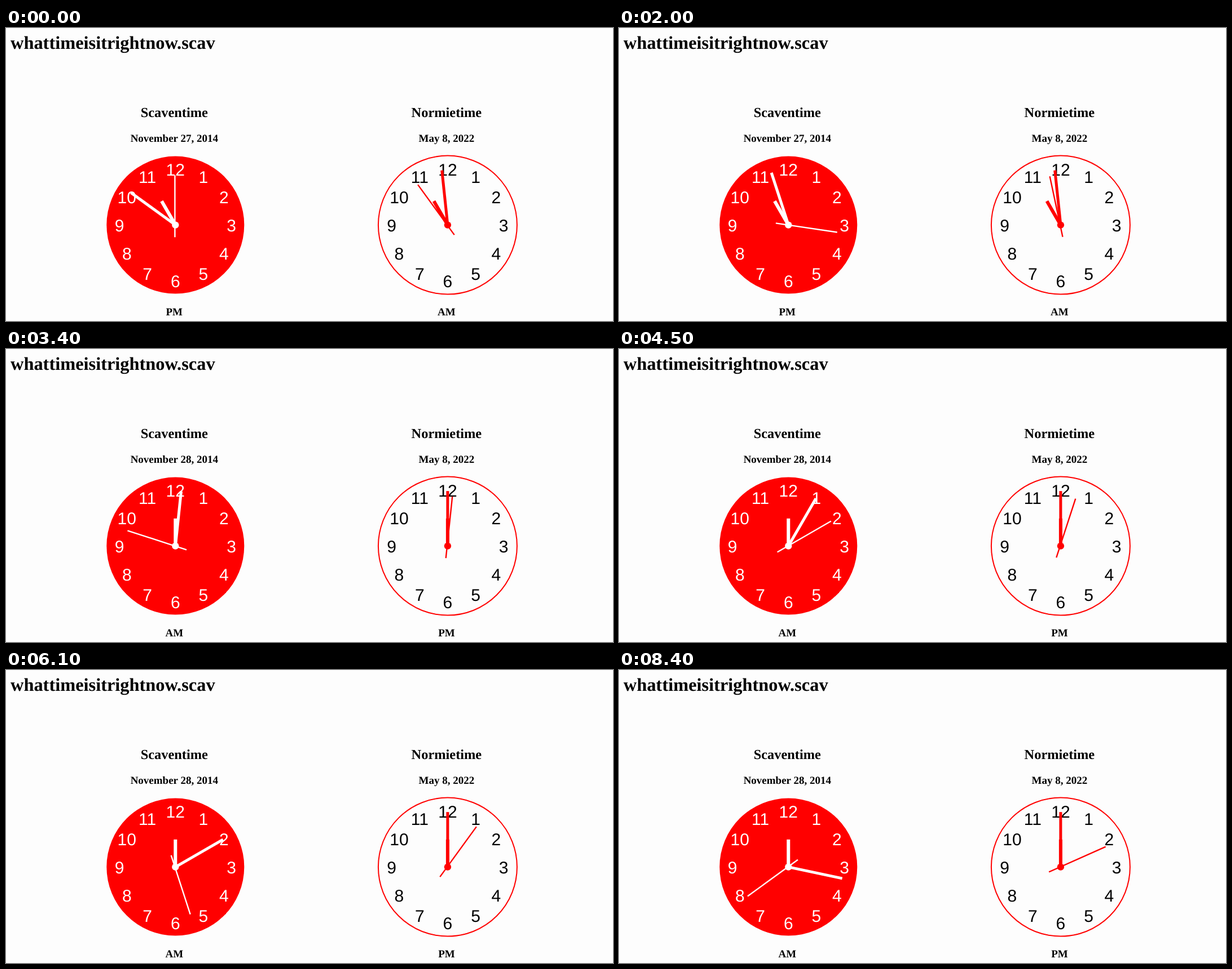
An HTML page for the animation above (8500 ms loop, 1076 by 520 pixels).

```html
<!DOCTYPE html>
<html lang="en">
<head>
<meta charset="utf-8">
<title>Two clocks</title>
<style>
  html, body { margin: 0; width: 100%; height: 100%; overflow: hidden; background: #fdfdfd; }
  svg { display: block; width: 1076px; height: 520px; }
  text { text-rendering: geometricPrecision; }
  .label { font-family: "Liberation Serif", Times, serif; font-weight: bold; }
  .mid { text-anchor: middle; }
  .digit { font: 30px "Liberation Sans", Helvetica, Arial, sans-serif; text-anchor: middle; }
</style>
</head>
<body>
<svg id="stage" viewBox="0 0 1076 520"></svg>
<script>
const LOOP = 8500, STEP = 100, CY = 349.6;
const stage = document.getElementById("stage");

function add(parent, tag, attrs, content) {
  const el = document.createElementNS("http://www.w3.org/2000/svg", tag);
  for (const key in attrs) el.setAttribute(key, attrs[key]);
  if (content !== undefined) el.textContent = content;
  parent.appendChild(el);
  return el;
}

const label = (x, y, size, content, mid = " mid") =>
  add(stage, "text", { x, y, class: "label" + mid, "font-size": size }, content);

function hand(parent, x, tip, tail, width, color) {
  const el = add(parent, "line", { x1: 0, x2: 0, y1: tail, y2: -tip, stroke: color, "stroke-width": width });
  return angle => el.setAttribute("transform", `translate(${x} ${CY}) rotate(${angle})`);
}

function makeClock({ cx, title, face, ink, color }) {
  const textX = cx - 2;
  label(textX, 158, 24.4, title);
  const date = label(textX, 201.5, 19, "");
  const half = label(textX, 510, 19, "");
  add(stage, "circle", { cx, cy: CY, ...face });
  for (let n = 1; n <= 12; n++) {
    const a = n * Math.PI / 6;
    add(stage, "text", {
      x: cx + 99.3 * Math.sin(a), y: 361 - 99.3 * Math.cos(a), class: "digit", fill: ink
    }, n);
  }
  const hour = hand(stage, cx, 48.8, 0, 6, color);
  const minute = hand(stage, cx, 97.5, 0, 5, color);
  const second = hand(stage, cx - 0.9, 88.3, 21.7, 2.4, color);
  add(stage, "circle", { cx, cy: CY, r: 6.2, fill: color });

  // sec counts from 11:00:00
  return (sec, day, am) => {
    hour((11 + Math.floor(sec / 3600)) * 30);
    minute(Math.floor(sec / 60) % 60 * 6);
    second(sec % 60 * 6);
    date.textContent = day;
    half.textContent = am ? "AM" : "PM";
  };
}

label(8, 37.3, 32.4, "whattimeisitrightnow.scav", "");

const setFast = makeClock({
  cx: 300.3, title: "Scaventime", ink: "#fff", color: "#fff",
  face: { r: 122, fill: "#f00" }
});
const setNormal = makeClock({
  cx: 782.9, title: "Normietime", ink: "#000", color: "#f00",
  face: { r: 123, fill: "none", stroke: "#f00", "stroke-width": 2 }
});

// Fast clock: [ms, seconds elapsed]; its pace wavers slightly
const pace = [[0, 0], [2000, 376.4], [3400, 648], [4500, 850], [6100, 1167], [7500, 1426], [8400, 1599]];

function elapsed(t) {
  const i = Math.max(1, pace.findIndex(p => p[0] >= t));
  const [t0, s0] = pace[i - 1], [t1, s1] = pace[i];
  return s0 + (s1 - s0) * (t - t0) / (t1 - t0);
}

function draw(ms) {
  const t = Math.floor(ms % LOOP / STEP) * STEP;
  const fast = 51 * 60 + elapsed(t);
  const late = fast >= 3600;
  setFast(fast, `November ${late ? 28 : 27}, 2014`, late);
  const normal = 59 * 60 + 54 + Math.floor((t + 150) / 500);
  setNormal(normal, "May 8, 2022", normal < 3600);
}

const start = performance.now();
function tick() {
  draw(performance.now() - start);
  requestAnimationFrame(tick);
}
draw(0);
requestAnimationFrame(tick);
</script>
</body>
</html>
```
